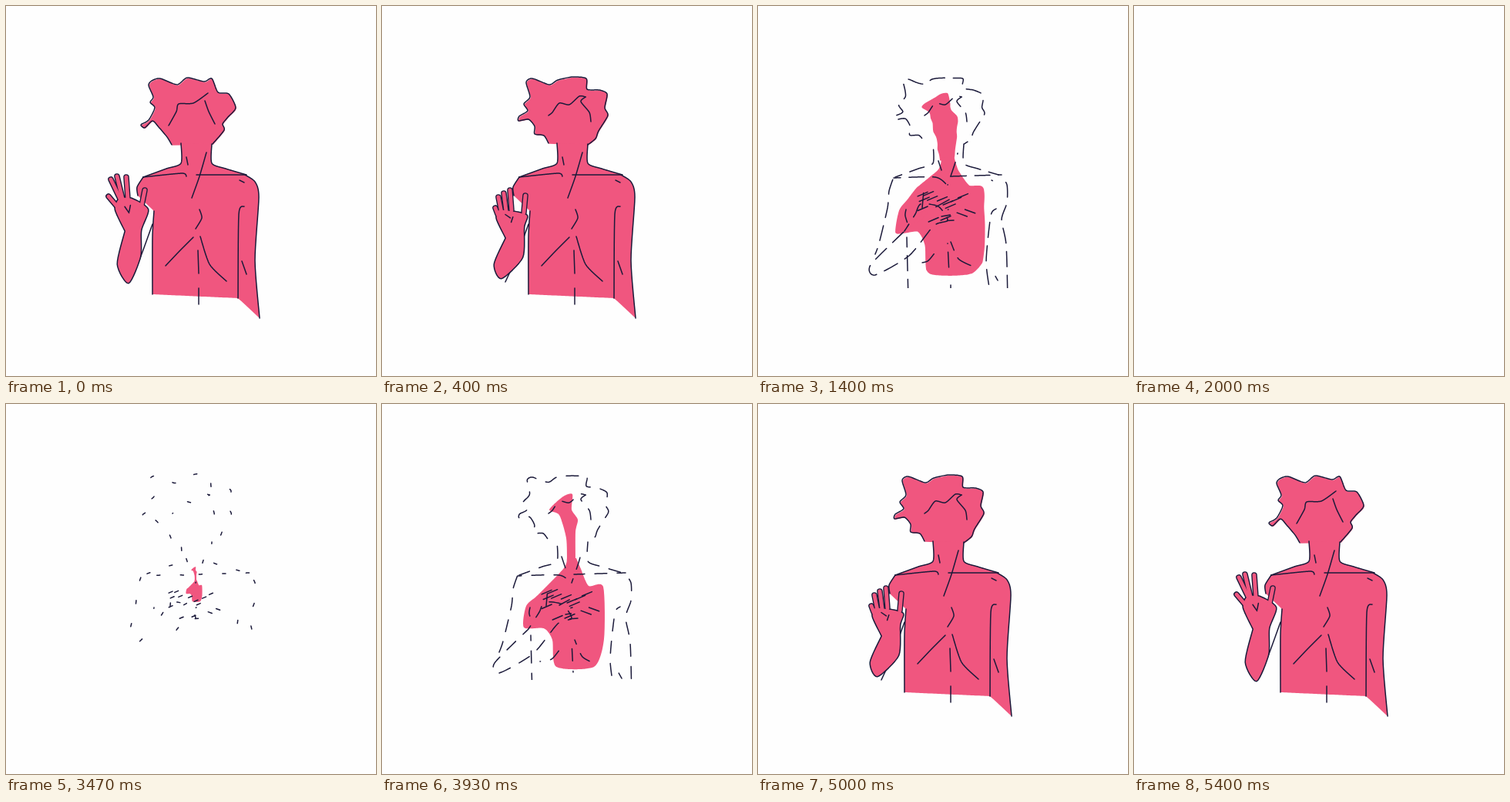
These frames come from a looping animation (480 px wide and 480 px high, 5.47 s). An HTML page with a canvas:

```html
<!DOCTYPE html>
<html>
<head>
<meta charset="utf-8">
<style>
html, body { margin: 0; height: 100%; overflow: hidden; background: #fefefe; }
canvas { display: block; width: 100vw; height: 100vh; }
</style>
</head>
<body>
<canvas id="stage" width="480" height="480"></canvas>
<script>
const PAPER = '#fefefe', PINK = '#f0567f', INK = '#1b1a3a';
const SAMPLES = 260, DISSOLVE = 16, CORE = 22, GONE = 28;
const ctx = document.getElementById('stage').getContext('2d');

const clamp = v => Math.max(0, Math.min(1, v));
const mix = (a, b, t) => a + (b - a) * t;
const mixPoint = (a, b, t) => [mix(a[0], b[0], t), mix(a[1], b[1], t)];
const mixPoints = (a, b, t) => a.map((p, i) => mixPoint(p, b[i], t));
const random = seed => { const v = Math.sin(seed * 12.9898) * 43758.5453; return v - Math.floor(v); };
const parse = text => text.split(' ').map(p => p.split(',').map(Number));

// Hermite curve through the points, a little tighter than Catmull-Rom.
function smooth(pts, tension = 0.36) {
  const at = i => pts[Math.max(0, Math.min(pts.length - 1, i))];
  const out = [pts[0]];
  for (let i = 0; i < pts.length - 1; i++)
    for (let k = 1; k <= 8; k++) {
      const t = k / 8, ease = t * t * (3 - 2 * t);
      const enter = tension * t * (1 - t) ** 2, leave = tension * t * t * (t - 1);
      out.push([0, 1].map(j => mix(at(i)[j], at(i + 1)[j], ease) +
        enter * (at(i + 1)[j] - at(i - 1)[j]) + leave * (at(i + 2)[j] - at(i)[j])));
    }
  return out;
}

// The same path as evenly spaced points, so any two paths can be blended.
function resample(pts) {
  const dist = [0];
  for (let i = 1; i < pts.length; i++)
    dist.push(dist[i - 1] + Math.hypot(pts[i][0] - pts[i - 1][0], pts[i][1] - pts[i - 1][1]));
  let i = 0;
  return Array.from({ length: SAMPLES }, (_, n) => {
    const want = dist[dist.length - 1] * n / (SAMPLES - 1);
    while (i < pts.length - 2 && dist[i + 1] < want) i++;
    return mixPoint(pts[i], pts[i + 1], clamp((want - dist[i]) / (dist[i + 1] - dist[i] || 1)));
  });
}

const curve = text => resample(smooth(parse(text)));
const pair = (first, second = first) => [curve(first), curve(second)];

// Every line has an opening and a closing pose.
const head = {
  hair: pair(
    '215,180 209,170 198,157 190,149 180,158 175,154 185,148 193,132 187,125 191,118 185,103 189,97 200,94 222,102 235,93 257,98 267,94 275,112 289,114 298,132 288,144 281,153 283,161 268,179',
    '216,178 210,168 198,166 198,156 190,147 177,149 178,143 189,136 184,127 192,118 187,99 195,94 217,102 228,96 247,92 265,94 266,108 282,109 292,114 289,132 293,142 281,162 277,172 267,180'),
  fringe: pair('211,155 221,137 224,127 243,126 262,113', '216,142 221,138 230,126 243,128 256,117 264,118'),
  temple: pair('258,123 263,137 271,153', '264,118 258,124 269,138 271,150')
};
const body = {
  leftShoulder: pair('227,178 227,204 208,211 178,222'),
  upperArm: pair('178,222 170,235 171,246', '176,222 170,240 168,262 157,308 152,322'),
  side: pair('192,266 190,300 190,374', '193,300 194,340 195,380'),
  armpit: pair('309,260 302,270 301,379', '309,263 302,272 296,332 302,377'),
  outerArm: pair('310,219 323,228 328,248 323,330 329,405', '315,220 323,232 323,255 316,277 322,310 324,384'),
  rightShoulder: pair('267,179 267,204 285,211 312,219'),
  tendons: pair('234,196 236,206', '233,198 238,213'),
  neck: pair('260,190 251,221 241,249', '259,191 255,206 246,232'),
  leftCollar: pair('178,222 228,217 234,221', '176,223 230,222 246,233'),
  rightCollar: pair('247,219 311,219', '249,221 316,219'),
  shoulderMark: pair('303,226 309,229'),
  armMark: pair('306,331 312,348', '306,347 311,356'),
  sternum: pair('251,264 254,275 246,289', '251,274 251,275'),
  leftRib: pair('243,300 225,318 207,337', '231,318 220,331 205,334'),
  rightRib: pair('252,299 264,335 286,357', '250,306 260,328 279,338'),
  middle: pair('249,317 250,347', '246,308 248,348'),
  navel: pair('250,366 250,387', '250,362 250,371'),
  crook: pair('190,283 174,327 160,358', '192,264 191,272 195,285')
};

// Shape of the stain that remains when the outlines fall apart.
const headCore = curve('240,205 239,174 230,144 217,137 235,120 247,117 246,137 254,150 251,166 251,206');
const torsoCore = curve('240,200 236,213 202,248 187,262 184,290 210,291 221,306 226,341 275,341 288,305 287,237 268,236 258,214 252,200');

// Wrist, palm and elbow contour, then knuckle and tip of each finger: open, closing, on the chest.
const forearms = [
  '155,292 142,264 147,250 163,250 184,264 175,291 174,325 159,359 145,335',
  '161,301 149,276 152,265 172,267 188,272 184,287 182,326 155,353 146,335',
  '190,292 204,270 211,257 234,260 246,278 228,285 196,324 152,349 146,336'
].map(parse);
const fingers = [
  '144,260 133,247 148,250 136,225 151,250 144,221 158,250 156,222 175,264 180,239',
  '150,270 147,262 155,268 151,248 161,266 158,243 168,265 166,239 184,268 186,246',
  '240,279 254,278 238,273 250,271 236,267 247,264 230,261 254,248 213,262 215,239'
].map(parse);

function trace(pts, close) {
  ctx.beginPath();
  pts.forEach(p => ctx.lineTo(...p));
  if (close) ctx.closePath();
}
function fill(pts) { trace(pts); ctx.fill(); }
function stroke(pts, color = INK, width = 1.5, close = false) {
  ctx.strokeStyle = color;
  ctx.lineWidth = width;
  trace(pts, close);
  ctx.stroke();
}

const blendLines = (group, t) =>
  Object.fromEntries(Object.entries(group).map(([name, [a, b]]) => [name, mixPoints(a, b, t)]));

function poseArm(step) {
  const i = step < 6 ? 0 : 1, t = clamp((step - 6 * i) / 6);
  const palm = mixPoints(forearms[i], forearms[i + 1], t), joints = mixPoints(fingers[i], fingers[i + 1], t);
  return {
    palm,
    outline: smooth([...palm, palm[0]]),
    digits: [0, 2, 4, 6, 8].map(k => joints.slice(k, k + 2))
  };
}

function drawArm({ palm, outline, digits }) {
  stroke(outline, INK, 3, true);
  digits.forEach(d => stroke(d, INK, 7.6));
  ctx.fillStyle = PINK;
  fill(outline);
  digits.forEach(d => stroke(d, PINK, 4.9));
  stroke([mixPoint(palm[2], palm[5], 0.25), mixPoint(palm[2], palm[5], 0.45)]);
  stroke([mixPoint(palm[3], palm[0], 0.2), mixPoint(palm[3], palm[0], 0.4)]);
}

function drawFills(face, torso, step) {
  const toCore = clamp((step - DISSOLVE) / (CORE - DISSOLVE));
  const shrink = 1 - 0.8 * clamp((step - CORE) / (GONE - CORE));
  const settle = pts => pts.map(p => mixPoint([246, 235], p, shrink));
  ctx.fillStyle = PINK;
  fill(settle(mixPoints(face, headCore, toCore)));
  fill(settle(mixPoints(torso, torsoCore, toCore)));
}

// Lines break into dashes that shorten while the gaps widen.
function drawBroken(lines, age) {
  ctx.save();
  ctx.beginPath();
  ctx.rect(0, 0, 480, 406 - 8 * age);
  ctx.clip();
  ctx.setLineDash([60 * 0.8 ** age, 2.2 * age]);
  lines.forEach((line, i) => {
    ctx.lineDashOffset = random(i + 1) * 60;
    stroke(line);
  });
  ctx.setLineDash([]);
  for (let i = 0; age > 2 && i < 14; i++) {
    const x = mix(205, 280, random(i + 40)), y = mix(242, 290, random(i + 70));
    const tilt = x > 255 && y > 262 ? 0.35 : -0.4, half = 7 * 0.85 ** Math.max(0, age - 6);
    const dx = half * Math.cos(tilt), dy = half * Math.sin(tilt);
    stroke([[x - dx, y - dy], [x + dx, y + dy]]);
  }
  ctx.restore();
}

function draw(step) {
  ctx.fillStyle = PAPER;
  ctx.fillRect(0, 0, 480, 480);
  if (step > GONE + 1) return;
  step = Math.min(step, GONE);
  ctx.lineCap = ctx.lineJoin = 'round';

  const face = blendLines(head, clamp(step / 6)), trunk = blendLines(body, clamp((step - 6) / 6));
  const sway = 1.5 * Math.sin(step * Math.PI / 6);
  face.hair = face.hair.map(([x, y], n) => [x + sway * Math.sin(n / 9), y + sway * Math.cos(n / 7)]);
  const torso = resample([
    ...trunk.leftShoulder, ...trunk.upperArm, ...trunk.side, trunk.armpit[SAMPLES - 1],
    ...trunk.outerArm.slice().reverse(), ...trunk.rightShoulder.slice().reverse()
  ]);
  const arm = poseArm(step), lines = [...Object.values(face), ...Object.values(trunk)];

  drawFills(face.hair.map(([x, y]) => [x + 0.8, y + 0.8]), torso, step);
  if (step <= DISSOLVE) {
    lines.forEach(line => stroke(line));
    drawArm(arm);
  } else {
    const age = step - DISSOLVE;
    ctx.fillStyle = PINK;
    fill(arm.outline.map(p => mixPoint(p, [215, 268], clamp(age / 6))));
    drawBroken([...lines, arm.outline, ...arm.digits], age);
  }
}

// Fifteen drawings a second; the second half plays the first one backwards.
function tick() {
  const t = performance.now() % 5470, rest = t % 200;
  const n = Math.floor(t / 200) * 3 + (rest >= 130 ? 2 : rest >= 70 ? 1 : 0);
  draw(Math.min(n, Math.max(0, 81 - n)));
  requestAnimationFrame(tick);
}
tick();
</script>
</body>
</html>
```
